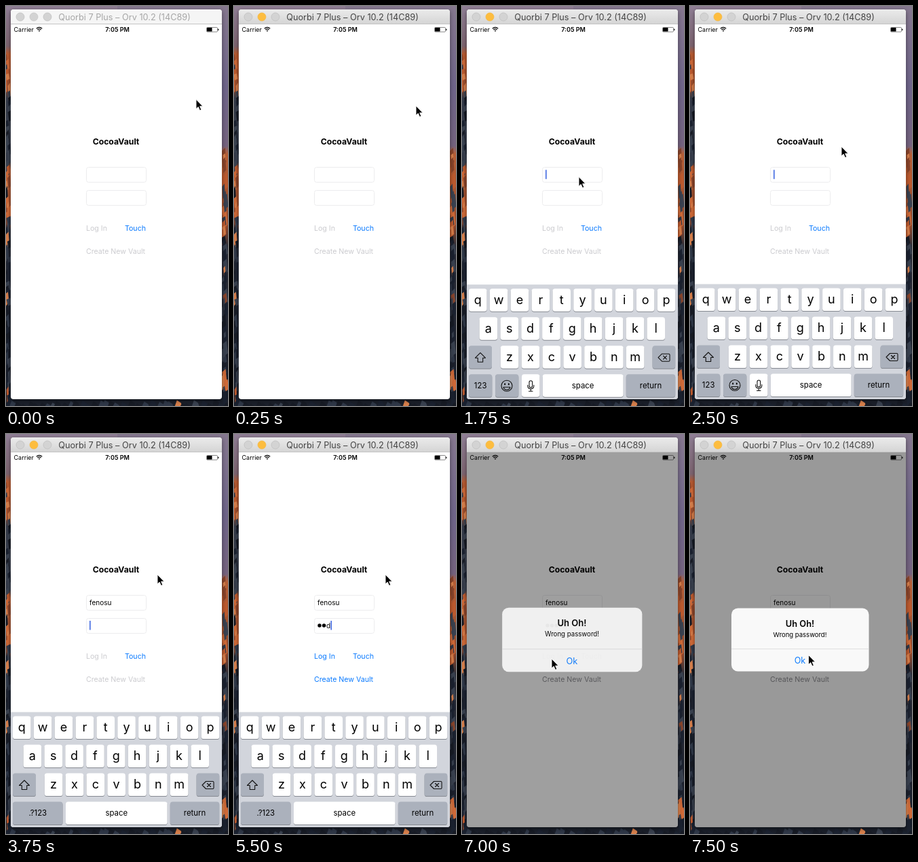
Write an HTML page that moves like this. It is 327x589 px and loops after 8000 ms.

```html
<!DOCTYPE html>
<html lang="en">
<head>
<meta charset="utf-8">
<title>Vault login</title>
<style>
  html, body { margin: 0; width: 100%; height: 100%; overflow: hidden; background: #1a1f2b; }
  svg { display: block; width: 327px; height: 589px; }
  text { font-family: Inter, Roboto, sans-serif; white-space: pre; }
  .mid { text-anchor: middle; }
  .btn { font-size: 10.6px; }
  .input { font-size: 10px; }
  .field { fill: #fff; stroke: #ececee; }
  .shade { fill: #868a92; }
  .key { fill: #fff; }
  .key.dark { fill: #abb1bc; }
  .letter { font-size: 18px; text-anchor: middle; }
  .word { font-size: 11.4px; text-anchor: middle; }
  .icon { fill: none; stroke: #111; stroke-width: 1.1; stroke-linejoin: round; stroke-linecap: round; }
</style>
</head>
<body>
<svg viewBox="0 0 327 589">
  <defs>
    <linearGradient id="skyL" x2="0" y2="1">
      <stop offset="0" stop-color="#907f96"/><stop offset=".1" stop-color="#7d6470"/>
      <stop offset=".12" stop-color="#b85a30"/><stop offset=".2" stop-color="#9a4c2c"/>
      <stop offset=".23" stop-color="#353b49"/><stop offset=".39" stop-color="#343a48"/>
      <stop offset=".41" stop-color="#b05a34"/><stop offset=".53" stop-color="#93492b"/>
      <stop offset=".56" stop-color="#252a36"/><stop offset="1" stop-color="#151b27"/>
    </linearGradient>
    <linearGradient id="skyR" x2="0" y2="1">
      <stop offset="0" stop-color="#86788f"/><stop offset=".2" stop-color="#6f658a"/>
      <stop offset=".35" stop-color="#75637f"/><stop offset=".37" stop-color="#b85f36"/>
      <stop offset=".55" stop-color="#93492b"/><stop offset=".6" stop-color="#2b2d38"/>
      <stop offset="1" stop-color="#151b27"/>
    </linearGradient>
    <linearGradient id="barOn" x2="0" y2="1">
      <stop offset="0" stop-color="#ebebeb"/><stop offset="1" stop-color="#d4d4d4"/>
    </linearGradient>
    <clipPath id="frame"><rect x="7" y="5" width="311" height="574" rx="4"/></clipPath>
  </defs>

  <g id="wall">
    <rect width="164" height="589" fill="url(#skyL)"/>
    <rect x="164" width="163" height="589" fill="url(#skyR)"/>
    <rect y="579" width="327" height="10" fill="#1b202b"/>
  </g>

  <rect x="7" y="5" width="311" height="574" rx="4" style="filter:drop-shadow(0 2px 3px rgba(0,0,0,.45))"/>
  <g clip-path="url(#frame)">
    <rect x="7" y="5" width="311" height="574" fill="#fff"/>
    <rect id="bar" x="7" y="5" width="311" height="22"/>
    <rect x="7" y="26" width="311" height="1" fill="#c4c4c4"/>
    <g stroke-width=".7">
      <circle cx="21" cy="16" r="6" fill="#d3d3d3" stroke="#bebebe"/>
      <circle id="amber" cx="41" cy="16" r="6"/>
      <circle cx="61" cy="16" r="6" fill="#d3d3d3" stroke="#bebebe"/>
    </g>
    <text id="title" class="mid" x="174.5" y="21" font-size="12.7">Quorbi 7 Plus – Orv 10.2 (14C89)</text>

    <g font-size="9">
      <text x="11.5" y="38">Carrier</text>
      <text class="mid" x="164" y="38" font-weight="600">7:05 PM</text>
    </g>
    <path d="M44.8 33.2q4.2-3.6 8.4 0M46.4 35q2.6-2.2 5.2 0" fill="none" stroke="#000" stroke-width="1.2"/>
    <path d="M47.6 36.2q1.4-1.1 2.8 0L49 37.8z"/>
    <rect x="295.5" y="31.5" width="16" height="6.6" rx="1.2" fill="none" stroke="#555" stroke-width=".7"/>
    <rect x="296" y="32" width="7.5" height="5.6" rx=".6"/>
    <rect x="312.2" y="33.5" width="1.2" height="2.6" rx=".5"/>

    <text class="mid" x="162" y="204" font-size="12.2" font-weight="700">CocoaVault</text>
    <rect class="field" x="118.5" y="237.5" width="88" height="22" rx="3"/>
    <rect class="field" x="118.5" y="271.5" width="88" height="22" rx="3"/>
    <text id="user" class="input" x="123" y="251.5"></text>
    <g id="dots"></g>
    <text id="pass" class="input" y="285.5"></text>
    <rect id="caret" width="1.6" height="13.5" fill="#4169e1"/>
    <text id="login" class="btn" x="118" y="331.3">Log In</text>
    <text id="touch" class="btn" x="175" y="331.3">Touch</text>
    <text id="create" class="btn" x="118" y="365">Create New Vault</text>

    <g id="board">
      <rect x="7" y="409.5" width="311" height="172" fill="#d2d5dc"/>
      <g id="keys"></g>
      <g id="rowMail"></g>
      <g id="rowPass"></g>
    </g>

    <rect id="dim" x="7" y="27" width="311" height="552"/>
    <g id="alert">
      <rect id="panel" x="61" y="256.5" width="202.5" height="93" rx="9.5"/>
      <path d="M61 316.5H263.5" stroke="#d8d8da" stroke-width=".8"/>
      <g class="mid">
        <text x="162" y="283.7" font-size="12.8" font-weight="600">Uh Oh!</text>
        <text x="162" y="298.5" font-size="9.5">Wrong password!</text>
        <text x="162" y="338.3" font-size="12.6" fill="#0a7aff">Ok</text>
      </g>
    </g>
  </g>
  <path id="mouse" d="M0 0V14L3.2 11.1L5.5 16.3L7.8 15.3L5.6 10.3H10Z" stroke="#fff" stroke-width=".9"/>
</svg>

<script>
const $ = id => document.getElementById(id);
const put = (parent, tag, attrs, text = '') => {
  const node = document.createElementNS('http://www.w3.org/2000/svg', tag);
  for (const name in attrs) node.setAttribute(name, attrs[name]);
  node.textContent = text;
  parent.append(node);
  return node;
};
const set = (id, name, value) => $(id).setAttribute(name, value);
const show = (id, on) => set(id, 'visibility', on ? 'visible' : 'hidden');

// Rocky desktop picture, seeded
let seed = 11;
const rnd = () => (seed = seed * 16807 % 2147483647) / 2147483647;
const pick = list => list[Math.floor(rnd() * list.length)];
const ember = ['#d06a38', '#bd5a2e', '#d8804c', '#8a452b'];
const stone = ['#1b2230', '#2f3848', '#171b25', '#3a4250'];
function rocks(x0, top, bands) {
  for (let y = top; y < 575; y += 5 + rnd() * 5) {
    const lit = bands.some(([from, to]) => y > from && y < to);
    const x = x0 + rnd() * 6, w = 2 + rnd() * 4, h = 8 + rnd() * 14;
    put($('wall'), 'path', {
      d: `M${x} ${y}l${w} ${-h / 4}l${w / 3} ${h}l${-w} ${h / 4}z`,
      fill: pick(rnd() < (lit ? 0.8 : 0.07) ? ember : stone)
    });
  }
}
rocks(-3, 74, [[70, 122], [232, 306]]);
rocks(316, 214, [[206, 258], [284, 335], [535, 560]]);
for (let x = 0; x < 327; x += 5 + rnd() * 8) {
  const lit = x > 215 && x < 305 ? 0.4 : 0.06;
  put($('wall'), 'path', { d: `M${x} 589l3 ${-3 - rnd() * 7}l6 4l2 6z`, fill: pick(rnd() < lit ? ember : stone) });
}

// Keyboard
const rowY = [415.5, 457.5, 499.5, 541.5];
function key(parent, x, row, w, label, dark) {
  const y = rowY[row], box = { x, width: w, height: 33.5, rx: 3.6 };
  put(parent, 'rect', { ...box, y: y + 1, class: 'shade' });
  put(parent, 'rect', { ...box, y, class: dark ? 'key dark' : 'key' });
  if (!label) return;
  const small = row === 3;
  put(parent, 'text', { x: x + w / 2, y: y + (small ? 20.7 : 22.5), class: small ? 'word' : 'letter' }, label);
}
const icon = (parent, d) => put(parent, 'path', { d, class: 'icon' });
const keys = $('keys'), mail = $('rowMail'), secret = $('rowPass');
['qwertyuiop', 'asdfghjkl', 'zxcvbnm'].forEach((letters, row) =>
  [...letters].forEach((c, i) => key(keys, [10, 25.6, 56.8][row] + 30.85 * i, row, 26.6, c)));
key(keys, 10, 2, 34, '', true);
key(keys, 280.6, 2, 33.6, '', true);
icon(keys, 'M27 510L34.5 517.5H30.7V523.5H23.3V517.5H19.5Z');
icon(keys, 'M289 517L294.5 511.5H304.5Q306 511.5 306 513V521Q306 522.5 304.5 522.5H294.5ZM296.5 514.5L301.5 519.5M301.5 514.5L296.5 519.5');
key(keys, 241.8, 3, 72.4, 'return', true);

key(mail, 10, 3, 34.3, '123', true);
key(mail, 49, 3, 34.3, '', true);
key(mail, 88, 3, 26.5, '');
key(mail, 118.8, 3, 118.8, 'space');
put(mail, 'circle', { cx: 66, cy: 558.5, r: 8, class: 'icon' });
icon(mail, 'M61 560.5H71Q70 564.5 66 564.5T61 560.5Z');
for (const cx of [63.2, 68.8]) put(mail, 'ellipse', { cx, cy: 556, rx: 1, ry: 1.5 });
put(mail, 'rect', { x: 99, y: 551, width: 4.6, height: 10, rx: 2.3, class: 'icon' });
icon(mail, 'M96.8 557.5V559Q97 563 101.3 563T105.8 559V557.5M101.3 563V566.5M98.5 566.5H104');

key(secret, 10, 3, 73.5, '.?123', true);
key(secret, 88, 3, 149.6, 'space');

for (let i = 0; i < 4; i++) put($('dots'), 'circle', { cx: 126 + 6.55 * i, cy: 282, r: 2.75 });

// Each step changes only what it names
const blue = '#0a7aff', off = '#cbcbcf';
const steps = [
  [0, { active: 0, at: [280, 137.5], user: '', dots: 0, pass: '', caret: 0, focus: 0, board: 0, lift: 0,
        login: off, create: off, dim: 0, alert: 0, grow: 1, panel: '#f6f6f6' }],
  [250, { active: 1, at: [268, 147] }],
  [750, { at: [182, 235] }],
  [1000, { at: [173, 253] }],
  [1250, { at: [172, 251.5] }],
  [1750, { board: 1, lift: 0.7, caret: 123 }],
  [2000, { lift: 0, at: [210, 219] }],
  [2250, { at: [223, 207], caret: 0 }],
  [2500, { caret: 123 }],
  [2750, { user: 'fe', caret: 132 }],
  [3000, { user: 'feno', caret: 143.6 }],
  [3250, { user: 'fenosu', caret: 155 }],
  [3750, { focus: 1, board: 2, caret: 123 }],
  [4500, { caret: 0 }],
  [4750, { pass: 'a', caret: 129.5, login: blue, create: blue }],
  [5000, { dots: 1, pass: 's', caret: 135 }],
  [5500, { dots: 2, pass: 'd', caret: 142.4 }],
  [5750, { dots: 4, pass: 'a', caret: 154.5 }],
  [6000, { at: [203, 222] }],
  [6250, { at: [133, 321] }],
  [6500, { at: [132, 331], caret: 0 }],
  [6750, { login: '#d3e7fc' }],
  [7000, { board: 0, dim: 0.375, alert: 0.94, grow: 1.018, login: '#8e8e93', create: '#8e8e93' }],
  [7250, { dim: 0.4, alert: 0.97, grow: 1.004 }],
  [7500, { alert: 1, grow: 1, panel: '#f9f9f9', at: [174.5, 325.5] }]
];
const loop = 8000;

function draw(s) {
  set('bar', 'fill', s.active ? 'url(#barOn)' : '#f5f5f5');
  set('title', 'fill', s.active ? '#444' : '#a6a6a6');
  set('amber', 'fill', s.active ? '#fdbd3f' : '#d3d3d3');
  set('amber', 'stroke', s.active ? '#f3b640' : '#c4c4c4');
  $('user').textContent = s.user;
  $('pass').textContent = s.pass;
  set('pass', 'x', 123 + 6.5 * s.dots);
  [...$('dots').children].forEach((dot, i) => dot.setAttribute('visibility', i < s.dots ? 'visible' : 'hidden'));
  show('caret', s.caret);
  set('caret', 'x', s.caret);
  set('caret', 'y', s.focus ? 275 : 241.3);
  set('login', 'fill', s.login);
  set('create', 'fill', s.create);
  set('touch', 'fill', s.dim ? '#8e8e93' : blue);
  set('board', 'display', s.board ? 'inline' : 'none');
  set('board', 'transform', `translate(0 ${s.lift})`);
  show('rowMail', s.board === 1);
  show('rowPass', s.board === 2);
  set('dim', 'opacity', s.dim);
  set('alert', 'opacity', s.alert);
  set('alert', 'transform', `translate(162 303) scale(${s.grow}) translate(-162 -303)`);
  set('panel', 'fill', s.panel);
  set('mouse', 'transform', `translate(${s.at})`);
}

const start = performance.now();
let last = -1;
function tick() {
  const t = (performance.now() - start) % loop;
  const done = steps.filter(step => step[0] <= t);
  if (done.length !== last) {
    last = done.length;
    draw(Object.assign({}, ...done.map(step => step[1])));
  }
  requestAnimationFrame(tick);
}
tick();
</script>
</body>
</html>
```
